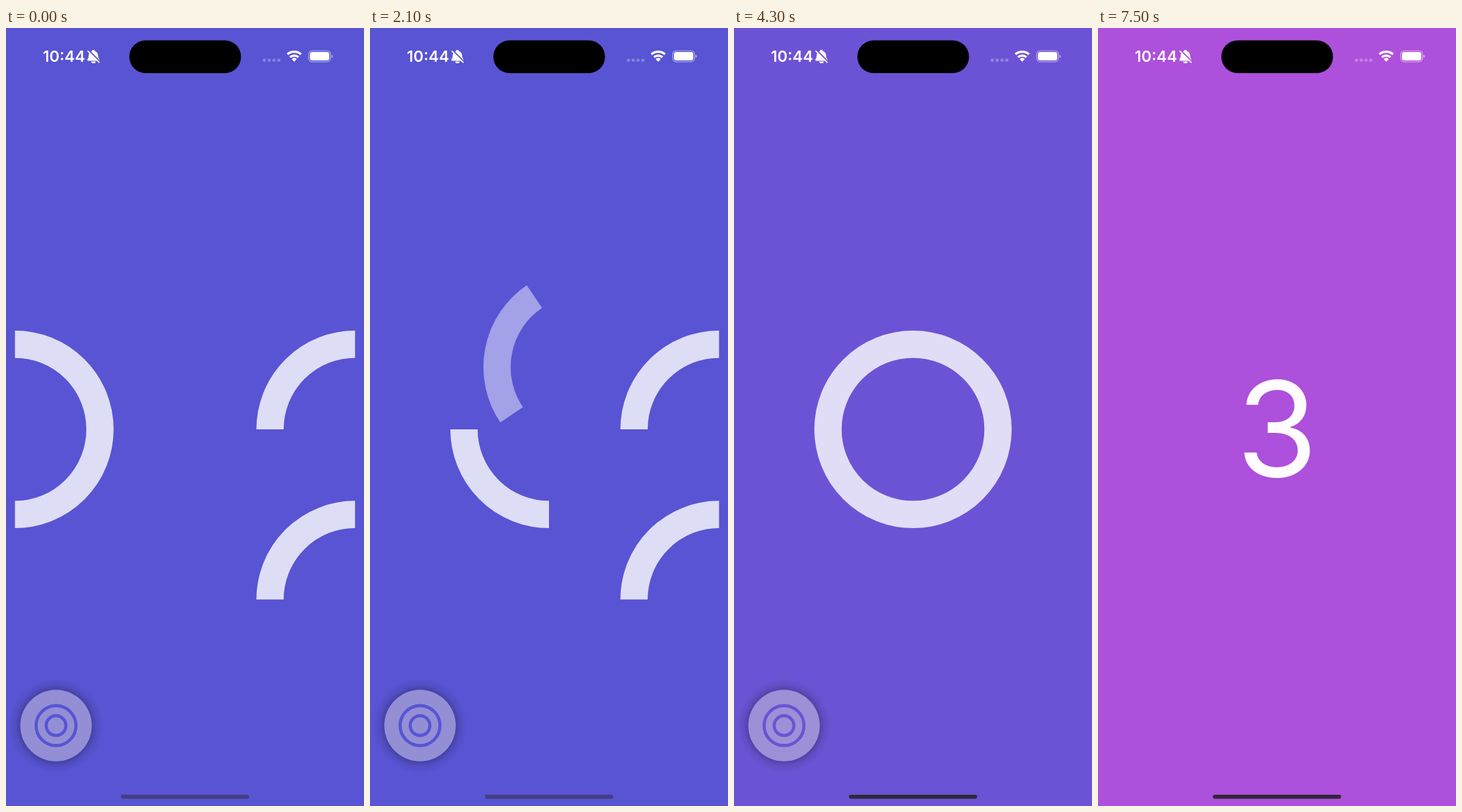
An HTML page for the animation above (8 s loop, 508x1103 px).

```html
<!DOCTYPE html>
<html lang="en">
<head>
<meta charset="utf-8">
<title>Ring assembly</title>
<style>
  html, body { margin: 0; width: 100%; height: 100%; overflow: hidden; }
  svg { display: block; width: 100%; height: 100%; }
  text { font-family: Inter, Roboto, sans-serif; text-anchor: middle; fill: #fff; }
</style>
</head>
<body>
<svg id="stage" viewBox="0 0 508 1103" color="#5854d3">
  <defs>
    <radialGradient id="shade">
      <stop offset=".74" stop-color="#000" stop-opacity=".24"/>
      <stop offset=".86" stop-color="#000" stop-opacity=".08"/>
      <stop offset="1" stop-color="#000" stop-opacity="0"/>
    </radialGradient>
  </defs>
  <rect width="508" height="1103" fill="currentColor"/>

  <g id="ring" fill="none" stroke="#fff" stroke-width="38.7"></g>

  <g id="button">
    <path fill="url(#shade)" fill-rule="evenodd"
      d="M4 989a67 67 0 1 1 134 0a67 67 0 1 1 -134 0ZM20.3 989a50.7 50.7 0 1 0 101.4 0a50.7 50.7 0 1 0 -101.4 0Z"/>
    <circle cx="71" cy="989" r="50.7" fill="#ddd7d8" fill-opacity=".45"/>
    <g fill="none" stroke="currentColor" stroke-width="4.5">
      <circle cx="71" cy="989" r="28.3"/>
      <circle cx="71" cy="989" r="14"/>
    </g>
  </g>

  <text id="count" x="254" y="636" font-size="187" fill-opacity=".985">3</text>

  <g fill="#fff">
    <text x="82.3" y="48" font-size="22" font-weight="600">10:44</text>
    <path d="M124 31c-1.400 0-2 .9-2.200 1.800c-2.900 1-4.300 3.400-4.500 6.400c-.2 2.800-.7 3.800-1.600 5c-.7 1-.3 2.300 1.100 2.300h14.600c1.400 0 1.800-1.300 1.100-2.300c-.9-1.200-1.600-2.200-1.800-5c-.2-3-1.600-5.400-4.500-6.400c-.2-.9-.8-1.800-2.200-1.800ZM121 47.400h6.400a3.200 2.500 0 0 1-6.400 0Z"/>
    <path d="M117.400 31.800L133.400 47.800" stroke="currentColor" stroke-width="2.200"/>
    <path d="M116.300 32.800L132.200 48.700" stroke="#fff" stroke-width="1.700" stroke-linecap="round"/>
  </g>

  <rect x="175" y="17.500" width="158.500" height="46.500" rx="23.250"/>

  <g fill="#fff" fill-opacity=".27">
    <circle cx="366.600" cy="45.700" r="2.400"/>
    <circle cx="373.500" cy="45.700" r="2.400"/>
    <circle cx="380.300" cy="45.700" r="2.400"/>
    <circle cx="387.100" cy="45.700" r="2.400"/>
  </g>
  <g id="wifi" fill="none" stroke="#fff"></g>

  <rect x="429.500" y="32.300" width="31" height="15.600" rx="4.900" fill="none" stroke="#fff" stroke-opacity=".5" stroke-width="1.100"/>
  <rect x="431.300" y="34.100" width="27.400" height="12" rx="3.300" fill="#fff"/>
  <path d="M461.800 37.800q1.800.7 1.800 2.400t-1.800 2.400Z" fill="#fff" fill-opacity=".55"/>

  <rect id="home" x="163" y="1087" width="182" height="5.700" rx="2.850"/>
</svg>
<script>
const LOOP = 8000, STEP = 100;
const CX = 254, CY = 569, R = 120.65;
const INDIGO = [88, 84, 211], PURPLE = [173, 80, 220];

// Quarter arcs: final start angle, turn made about the outer corner, time span.
const pieces = [
  { angle: 90, turn: 90, from: 450, to: 1103 },
  { angle: 180, turn: 270, from: 1103, to: 2244 },
  { angle: 270, turn: 90, from: 2244, to: 3068 },
  { angle: 0, turn: 180, from: 3068, to: 4123 }
];

const byId = id => document.getElementById(id);
const progress = (t, from, to) => Math.min(1, Math.max(0, (t - from) / (to - from)));
const ease = x => x * x * (3 - 2 * x);

function polar(cx, cy, r, deg) {
  const a = deg * Math.PI / 180;
  return [cx + r * Math.cos(a), cy + r * Math.sin(a)];
}

function arc(cx, cy, r, a, b) {
  return `M${polar(cx, cy, r, a)}A${r} ${r} 0 0 1 ${polar(cx, cy, r, b)}`;
}

function addPath(parent, d, width) {
  const el = document.createElementNS("http://www.w3.org/2000/svg", "path");
  el.setAttribute("d", d);
  if (width) el.setAttribute("stroke-width", width);
  return parent.appendChild(el);
}

for (const p of pieces) {
  p.el = addPath(byId("ring"), arc(CX, CY, R, p.angle, p.angle + 90));
  p.pivot = polar(CX, CY, R * Math.SQRT2, p.angle + 45);
}

for (const [r, w] of [[14.4, 3.3], [8.900, 3.3], [2.700, 5.400]]) {
  addPath(byId("wifi"), arc(409, 48, r, 228, 312), w);
}

function draw(t) {
  for (const { el, pivot, turn, from, to } of pieces) {
    const p = progress(t, from, to);
    el.setAttribute("transform", `rotate(${turn * (p - 1)} ${pivot})`);
    el.setAttribute("opacity", 0.8 * (1 - Math.sin(Math.PI * p ** 1.17)));
  }

  const mix = ease(progress(t, 3990, 4960));
  const tint = INDIGO.map((c, i) => Math.round(c + (PURPLE[i] - c) * mix));
  byId("stage").setAttribute("color", `rgb(${tint})`);
  byId("home").setAttribute("fill", t < 4100 ? "#443e80" : "#30283a");

  const swap = ease(progress(t, 6120, 7080));
  byId("ring").setAttribute("opacity", 1 - swap);
  byId("button").setAttribute("opacity", 1 - swap);
  byId("count").setAttribute("opacity", swap);
}

// The picture advances in steps of a tenth of a second.
function tick() {
  const t = performance.now() % LOOP;
  draw(Math.floor(t / STEP + 0.02) * STEP);
  requestAnimationFrame(tick);
}

draw(0);
requestAnimationFrame(tick);
</script>
</body>
</html>
```
